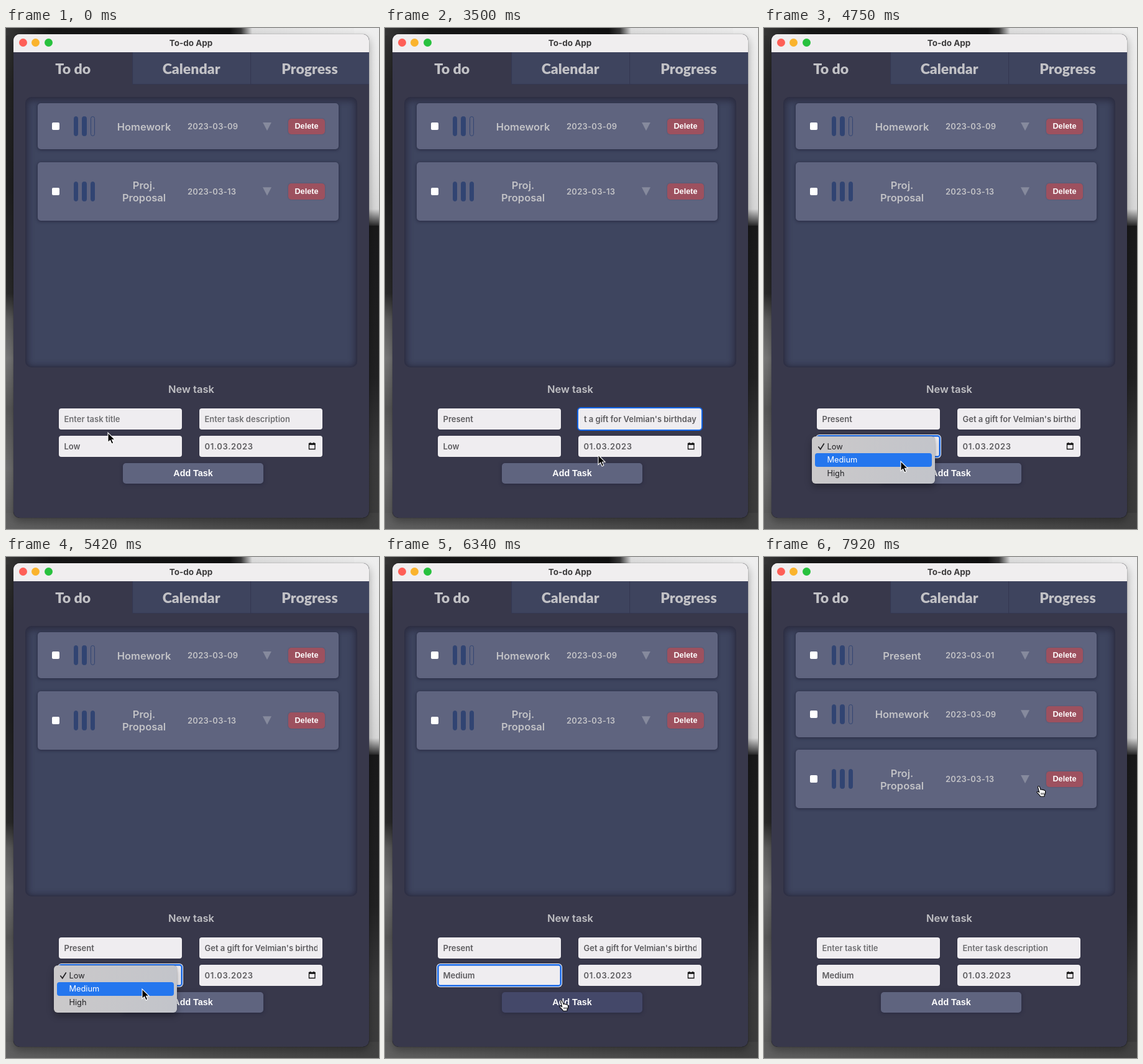
Animation, 600 px wide and 806 px high, one loop 8 s. Source, as an HTML page:

```html
<!DOCTYPE html>
<html lang="en">
<head>
<meta charset="utf-8">
<title>To-do App</title>
<style>
html, body { margin: 0; width: 100%; height: 100%; overflow: hidden; }
#stage { position: relative; width: 600px; height: 806px; overflow: hidden; background: #202021; font: 600 13px Inter, sans-serif; }
#stage div { position: absolute; box-sizing: border-box; white-space: nowrap; }
.center { display: flex; align-items: center; justify-content: center; text-align: center; }
.window { background: #38384b; border-radius: 10px; box-shadow: 0 0 1px #000, 0 6px 14px rgba(0,0,0,.32); }
.titlebar { background: #f0eeef; border-radius: 10px 10px 0 0; color: #3d3c3d; font-weight: 700; font-size: 13.5px; }
.light { border-radius: 50%; }
.tab { font: 900 23.1px Lato, sans-serif; color: #c2c2c6; }
.tab.idle { background: #3e445e; box-shadow: inset 1px -1px 1px #343750; }
.panel { background: #3e455f; border-radius: 10px; box-shadow: inset 0 2px 10px 5px rgba(43,43,62,.8), inset 0 0 3px 1px rgba(43,43,62,.6); }
.card { background: #5f647f; border-radius: 5px; box-shadow: 0 1px 4px 1px rgba(35,37,60,.65); color: #c2c2c6; }
.check { background: #fff; border-radius: 2px; }
.bar { border: 1px solid #314472; border-radius: 3.5px; }
.bar.full { background: #314472; }
.name { font-size: 16.5px; line-height: 20px; }
.date { display: flex; align-items: center; letter-spacing: .25px; }
.arrow { background: #868a9d; clip-path: polygon(0 0, 100% 0, 50% 100%); }
.delete { background: #9d515f; border-radius: 5px; color: #fff; font: 700 12.7px "Liberation Sans", Arial, sans-serif; box-shadow: 0 0 2px rgba(50,45,70,.4); }
.heading { font-size: 16.5px; color: #c0c0c4; }
.field { background: #efedf0; border-radius: 4px; color: #5d5c5f; box-shadow: 0 0 2px rgba(30,30,50,.35); }
.field.focus { box-shadow: 0 0 0 2px #1265e8; }
.field.select.focus { box-shadow: inset 0 0 0 1.5px #1265e8, 0 0 0 1px #1265e8, 0 0 0 2px #fff; }
.clip { display: flex; align-items: center; overflow: hidden; }
.clip span { position: relative; display: block; height: 16px; line-height: 16px; white-space: pre; }
.clip i { position: absolute; left: 100%; top: 0; width: 1px; height: 15px; background: #222; }
.clip.empty::before { content: attr(data-hint); position: absolute; left: 0; color: #707073; }
.spaced { letter-spacing: .65px; }
.add { background: #5f647f; border-radius: 5px; color: #fff; font: 700 14.3px "Liberation Sans", Arial, sans-serif; box-shadow: 0 1px 5px 1px rgba(35,37,60,.55); }
.add.hover { background: #444869; }
.menu { background: linear-gradient(100deg, #cbc9ca, #c2c4ca); border-radius: 6px; box-shadow: 0 0 1px #222, 0 5px 12px rgba(0,0,0,.3); color: #202023; font-weight: 400; font-size: 12.8px; }
.option { display: flex; align-items: center; padding-left: 19.5px; border-radius: 4px; }
.option.hover { background: #2476ee; color: #fff; }
svg { position: absolute; left: 0; top: 0; overflow: visible; }
</style>
</head>
<body>
<div id="stage"></div>
<script>
const LOOP = 8000;
const stage = document.getElementById('stage');

function box(parent, cls, x, y, w, h, text = '') {
  const node = document.createElement('div');
  node.className = cls;
  node.style.cssText = `left:${x}px;top:${y}px;width:${w}px;height:${h}px`;
  node.innerHTML = text;
  parent.append(node);
  return node;
}

function paint(x, y, w, h, background) {
  box(stage, '', x, y, w, h).style.background = background;
}

// Blurred greyscale wallpaper around the window
paint(0, 0, 300, 806, 'linear-gradient(#343434, #252525 12%, #1f1f20 32%, #2a2a2a 53%, #5c5c5c 58%, #787878 66%, #585858 76%, #707070 88%, #565656)');
paint(0, 0, 600, 12, 'linear-gradient(90deg, #363636, #171717 12%, #111 60%, #3a3a3a 63%, #dedede 66%, #eee)');
paint(560, 0, 40, 320, 'linear-gradient(#eee, #e4e4e4 60%, #d8d8d8 91%, #1d1d1e)');
paint(560, 318, 40, 488, 'linear-gradient(#19191a, #222223 50%, #3a3a3b 75%, #3c3c3c)');
paint(0, 780, 600, 26, 'linear-gradient(90deg, #606060, #585858 25%, #4c4c4c 60%, #424242)');

// Window chrome
box(stage, 'window', 12, 10, 572, 778);
box(stage, 'titlebar', 12, 10, 572, 29);
box(stage, 'titlebar center', 12, 10, 571, 27, 'To-do App');
['#fe5f57', '#fab32d', '#28c13e'].forEach((color, i) => {
  box(stage, 'light', 20.5 + i * 20.6, 17.2, 13, 13).style.background = color;
});
['To do', 'Calendar', 'Progress'].forEach((label, i) => {
  box(stage, 'tab center' + (i ? ' idle' : ''), 12.5 + i * 190.4, 39, 190.4, 51.5, label);
});
box(stage, 'panel', 31, 111, 534, 435);

// Task list
const FIRST = 121.2, PITCH = 94.5;

function makeCard(name, date, level, h) {
  const card = box(stage, 'card', 51, FIRST, 484, h);
  const mid = h / 2;
  box(card, 'check', 22.5, mid - 6, 12, 12);
  for (let i = 0; i < 3; i++) {
    box(card, 'bar' + (i < level ? ' full' : ''), 57.5 + i * 13.7, mid - 16, 7.5, 32);
  }
  box(card, 'name center', 121, 0, 100, h + 1, name);
  box(card, 'date', 241, 0, 90, h + .5, date);
  box(card, 'arrow', 362, mid - 6.5, 14, 13.5);
  box(card, 'delete center', 403, mid - 12.5, 59, 25.5, 'Delete');
  return card;
}
const present = makeCard('Present', '2023-03-01', 2, 74);
const homework = makeCard('Homework', '2023-03-09', 2, 74);
const proposal = makeCard('Proj.<br>Proposal', '2023-03-13', 3, 94);

// Form
box(stage, 'heading center', 198, 570, 200, 22, 'New task');

function makeField(x, y, hint = '') {
  const node = box(stage, 'field', x, y, 198, 34);
  const clip = box(node, 'clip', 8.5, 0, 181, 34);
  clip.dataset.hint = hint;
  const span = document.createElement('span');
  const text = document.createTextNode('');
  const caret = document.createElement('i');
  span.append(text, caret);
  clip.append(span);
  return {
    node,
    set(value, focus = false, showCaret = false) {
      text.data = value;
      clip.classList.toggle('empty', !value);
      node.classList.toggle('focus', focus);
      caret.style.display = showCaret ? 'block' : 'none';
      const scroll = focus ? Math.max(0, span.offsetWidth - clip.clientWidth) : 0;
      span.style.transform = `translateX(${-scroll}px)`;
    }
  };
}
const title = makeField(85, 612, 'Enter task title');
const details = makeField(311, 612, 'Enter task description');
const priority = makeField(85, 656);
const due = makeField(311, 656);
priority.node.classList.add('select');
due.node.classList.add('spaced');
due.set('01.03.2023');
box(due.node, '', 175, 10, 13, 13,
  '<svg width="13" height="13"><path d="M1.5 2.5h9.5v9h-9.5z" fill="none" stroke="#111" stroke-width="1.3"/><path d="M1 2h10.5v2.8H1zM2.8 .7h1.5v2H2.8zM8.3 .7h1.5v2H8.3z" fill="#111"/></svg>');
const add = box(stage, 'add center', 188, 699.5, 226, 33.5, 'Add Task');

const menu = box(stage, 'menu', 77, 657, 198, 75.5);
const options = ['Low', 'Medium', 'High'].map((label, i) =>
  box(menu, 'option', 5, 5.2 + i * 21.7, 188, 21.7, label));
box(menu, '', 10, 11, 11, 11,
  '<svg width="11" height="11"><path d="M.8 6l3 3.7L9.3 1" fill="none" stroke="#202023" stroke-width="1.7" stroke-linecap="round"/></svg>');

// Pointers, drawn with the hot spot at 0,0
const pointer = box(stage, '', 0, 0, 1, 1);
const SHAPES = {
  arrow: '<path d="M0 0V15.6L3.6 12.3 6.1 18 8.8 16.8 6.4 11.3H11.2Z" fill="#000" stroke="#fff" stroke-width="1.1"/>',
  beam: '<path d="M-3-8Q0-8 0-6Q0-8 3-8M0-6V6M-3 8Q0 8 0 6Q0 8 3 8M-1.5 3h3" fill="none" stroke="#222" stroke-width="1.2"/>',
  hand: '<path d="M-1.5 1.2C-1.5-.5 .9-.8 1.5 .9L3.2 5.6C3.5 4.5 5.4 4.5 5.8 5.8C6.5 4.9 8 5.2 8.3 6.5C9.2 5.9 10.5 6.5 10.6 7.8C10.9 10.5 10.7 12.5 9 14.2V16.2H2.6C1.8 14.3-.2 12.7-2.2 10.7C-3.8 9.1-2.3 7.6-.8 8.6L.8 9.8Z" fill="#fff" stroke="#000" stroke-width="1.1" stroke-linejoin="round"/><path d="M4 10.4v3M6.1 10.4v3M8.2 10.4v3" stroke="#000" stroke-width=".9"/>'
};
const shapes = {};
for (const kind in SHAPES) {
  pointer.insertAdjacentHTML('beforeend', `<svg width="1" height="1">${SHAPES[kind]}</svg>`);
  shapes[kind] = pointer.lastChild;
}

// time, x, y
const PATH = [
  [0, 164, 651], [200, 164, 651], [560, 158, 633], [1920, 158, 633],
  [2170, 350, 632], [3250, 350, 632], [3500, 343, 687], [3850, 232, 674],
  [4180, 226, 676], [4600, 220, 697], [4900, 220, 697], [5420, 219, 695],
  [5750, 219, 695], [6200, 284, 714], [6720, 284, 714], [7250, 372, 520],
  [7700, 434, 398], [7920, 442, 369], [8000, 442, 369]
];
const TITLE = { text: 'Present', focus: 650, start: 1200, end: 1640 };
const DETAILS = { text: "Get a gift for Velmian's birthday", focus: 2180, start: 2260, end: 3220 };
const MENU_OPEN = 4050, MENU_PICK = 5650, ADDED = 6620;

function pointerAt(t) {
  const i = Math.max(1, PATH.findIndex(p => p[0] >= t));
  const [t0, x0, y0] = PATH[i - 1], [t1, x1, y1] = PATH[i];
  const u = (t - t0) / (t1 - t0), ease = u * u * (3 - 2 * u);
  return [x0 + (x1 - x0) * ease, y0 + (y1 - y0) * ease];
}

const typed = (job, t) => {
  const part = Math.min(1, Math.max(0, (t - job.start) / (job.end - job.start)));
  return job.text.slice(0, Math.round(part * job.text.length));
};
const within = (t, from, to) => t >= from && t < to;

function hits(node, x, y) {
  const left = node.offsetLeft, top = node.offsetTop;
  return node.style.display !== 'none' && within(x, left, left + node.offsetWidth) && within(y, top, top + node.offsetHeight);
}

function showForm(field, job, t, blur) {
  const focus = within(t, job.focus, blur);
  const since = t - (t > job.end ? job.end : job.focus);
  const blink = within(t, job.start, job.end) || since % 1000 < 500;
  field.set(t < ADDED ? typed(job, t) : '', focus, focus && blink);
}

function render(t) {
  const open = within(t, MENU_OPEN, MENU_PICK);
  const added = t >= ADDED;
  const shift = added ? PITCH : 0;
  present.style.display = added ? 'block' : 'none';
  homework.style.top = FIRST + shift + 'px';
  proposal.style.top = FIRST + PITCH + shift + 'px';

  showForm(title, TITLE, t, DETAILS.focus);
  showForm(details, DETAILS, t, MENU_OPEN);
  priority.set(t < MENU_PICK ? 'Low' : 'Medium', within(t, MENU_OPEN, ADDED));
  menu.style.display = open ? 'block' : 'none';

  const [x, y] = pointerAt(t);
  const row = Math.floor((y - 662.2) / 21.7);
  options.forEach((node, i) => node.classList.toggle('hover', i === row));
  const overAdd = !open && hits(add, x, y);
  add.classList.toggle('hover', overAdd);

  let kind = 'arrow';
  if (!open) {
    if (overAdd || [present, homework, proposal].some(n => hits(n, x, y))) kind = 'hand';
    else if ([title, details].some(f => hits(f.node, x, y))) kind = 'beam';
  }
  if (within(t, TITLE.start, 1920) || within(t, DETAILS.start, 3250)) kind = '';
  for (const k in shapes) shapes[k].style.display = k === kind ? 'block' : 'none';
  pointer.style.transform = `translate(${x}px, ${y}px)`;
}

const begin = performance.now();
function tick() {
  render((performance.now() - begin) % LOOP);
  requestAnimationFrame(tick);
}
tick();
</script>
</body>
</html>
```
